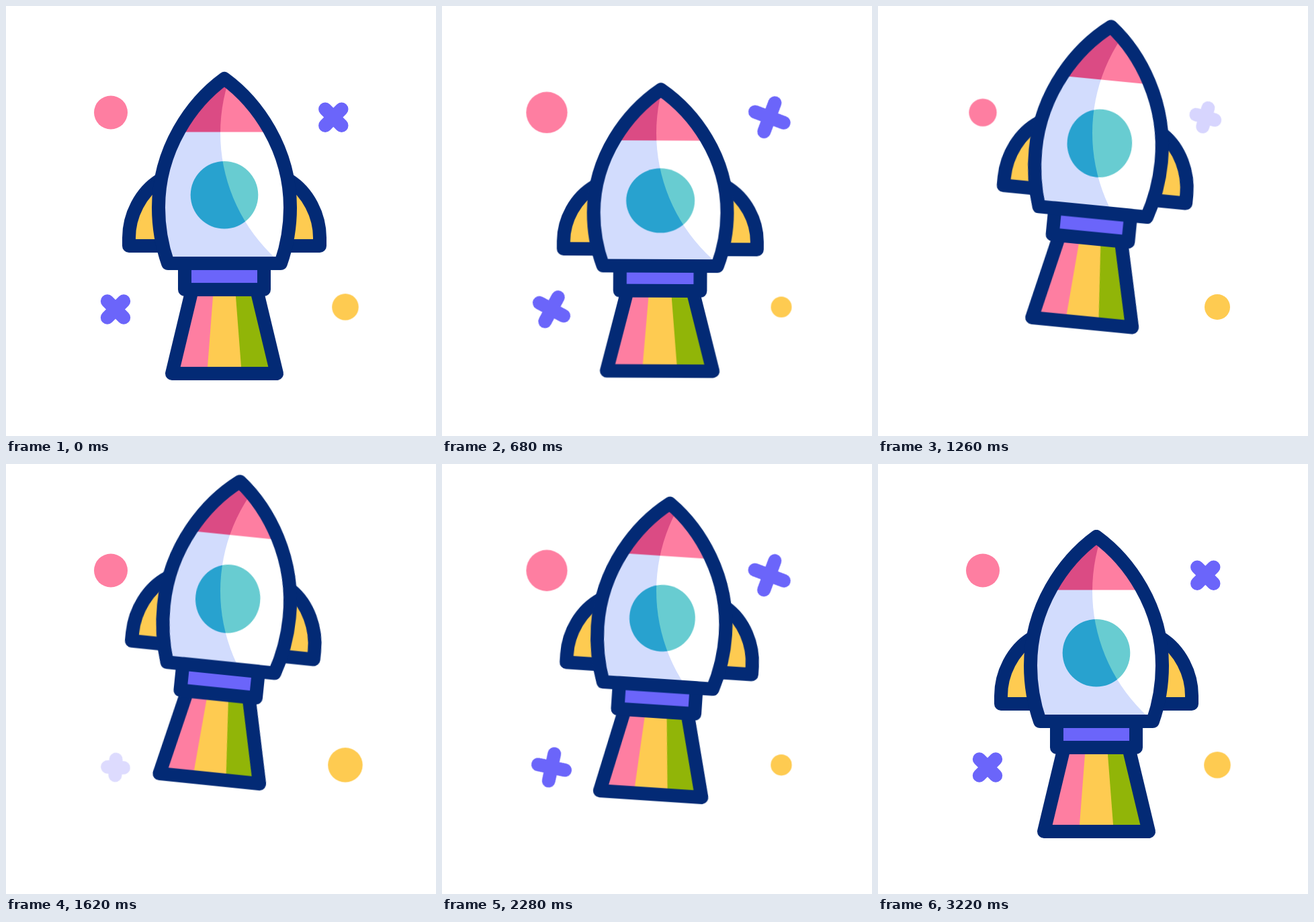
Write an HTML page that moves like this. It is 640 px wide and 640 px high and loops after 3300 ms.

```html
<!DOCTYPE html>
<html lang="en">
<head>
<meta charset="utf-8">
<title>Rocket</title>
<style>
:root {
  --navy: #032a75;
  --pink: #fe7ea1;
  --yellow: #fecb51;
  --purple: #6b65fa;
  --sine: cubic-bezier(.37, 0, .63, 1);
  --in: cubic-bezier(.33, 0, .67, .33);
  --out: cubic-bezier(.33, .67, .67, 1);
}
html, body { margin: 0; width: 100%; height: 100%; overflow: hidden; background: #fff; }
svg { display: block; width: 100%; height: 100%; }

.line, .cross {
  stroke-width: 20;
  stroke-linejoin: round;
  vector-effect: non-scaling-stroke;
}
.line { fill: none; stroke: var(--navy); }
.cross { fill: none; stroke: var(--purple); stroke-linecap: round; }

.fly, .squash, .cross, .dot { animation: 3300ms linear infinite; }
.fly { transform-origin: 325px 329px; animation-name: fly; }
.squash { transform-origin: 325px 547px; animation-name: squash; }
.pink { fill: var(--pink); transform-origin: 156px 158.5px; animation-name: pulse; animation-timing-function: var(--sine); }
.yellow { fill: var(--yellow); transform-origin: 505px 448px; animation-name: swell; animation-timing-function: var(--sine); }
.left { transform-origin: 163px 451.5px; animation-name: spin-left; }
.right { transform-origin: 487.3px 165.7px; animation-name: spin-right; }

@keyframes fly {
  0% { transform: translateY(0) rotate(0deg); }
  20% { transform: translateY(0) rotate(0deg); animation-timing-function: var(--in); }
  27.27% { transform: translateY(-49px) rotate(3.2deg); animation-timing-function: var(--out); }
  32.73% { transform: translateY(-73px) rotate(5.45deg); }
  38.18% { transform: translateY(-75px) rotate(5.6deg); }
  49.09% { transform: translateY(-77.5px) rotate(5.85deg); animation-timing-function: var(--sine); }
  54.55% { transform: translateY(-83px) rotate(6.4deg); animation-timing-function: var(--in); }
  59.39% { transform: translateY(-79.3px) rotate(6.05deg); animation-timing-function: var(--in); }
  66.06% { transform: translateY(-71.5px) rotate(5.3deg); }
  70.3% { transform: translateY(-49px) rotate(3.2deg); animation-timing-function: var(--out); }
  76.5% { transform: translateY(0) rotate(0deg); }
  100% { transform: translateY(0) rotate(0deg); }
}
@keyframes squash {
  0% { transform: scale(1, 1); animation-timing-function: var(--sine); }
  20% { transform: scale(1.017, .952); animation-timing-function: var(--in); }
  27.27% { transform: scale(.977, .981); animation-timing-function: var(--out); }
  32.73% { transform: scale(.962, 1.005); }
  38.18% { transform: scale(.96, 1.008); }
  54.55% { transform: scale(.958, 1.015); }
  59.39% { transform: scale(.96, 1.012); }
  66.06% { transform: scale(.963, 1.004); }
  70.3% { transform: scale(.977, .981); animation-timing-function: var(--out); }
  77.5% { transform: scale(1.017, .952); animation-timing-function: var(--sine); }
  97.58%, 100% { transform: scale(1, 1); }
}
@keyframes pulse {
  0%, 48.8%, 97.58%, 100% { transform: scale(1); }
  24.2%, 73% { transform: scale(1.24); }
  40.9%, 89.7% { transform: scale(.8); }
}
@keyframes swell {
  0% { transform: scale(.99); }
  4.85% { transform: scale(1.05); }
  24.2% { transform: scale(.75); animation-timing-function: var(--in); }
  38.18% { transform: scale(.95); animation-timing-function: var(--out); }
  49.7% { transform: scale(1.29); animation-timing-function: var(--in); }
  59.39% { transform: scale(1.1); animation-timing-function: var(--out); }
  73.9% { transform: scale(.76); }
  97.58%, 100% { transform: scale(.99); }
}
@keyframes spin-left {
  0% { transform: rotate(0deg) scale(1); opacity: 1; animation-timing-function: var(--in); }
  10.91% { transform: rotate(31deg) scale(1.21); }
  17% { transform: rotate(58deg) scale(1.32); }
  24% { opacity: 1; }
  27.27% { transform: rotate(101deg) scale(.95); opacity: .85; }
  33.9% { transform: rotate(130deg) scale(.6); opacity: 0; }
  34% { transform: rotate(-140deg) scale(.6); }
  47.3% { transform: rotate(-140deg) scale(.6); opacity: 0; }
  55% { opacity: 1; }
  59.39% { transform: rotate(-88deg) scale(1.19); }
  66.7% { transform: rotate(-45deg) scale(1.25); animation-timing-function: var(--out); }
  78.79% { transform: rotate(-5deg) scale(1.05); animation-timing-function: var(--out); }
  88%, 100% { transform: rotate(0deg) scale(1); opacity: 1; }
}
@keyframes spin-right {
  0%, 12% { transform: rotate(0deg) scale(1); opacity: 1; animation-timing-function: var(--in); }
  18.8% { transform: rotate(53deg) scale(1.26); }
  23.6% { transform: rotate(86deg) scale(1.43); }
  27.27% { transform: rotate(110.6deg) scale(1.4); opacity: 1; }
  31% { opacity: 1; }
  38.18% { transform: rotate(151deg) scale(.84); opacity: .28; }
  41.2% { transform: rotate(160deg) scale(.7); opacity: 0; }
  41.3% { transform: rotate(-160deg) scale(.7); }
  57.3% { transform: rotate(-160deg) scale(.7); opacity: 0; }
  59.39% { transform: rotate(-151deg) scale(.84); opacity: .17; }
  66.5% { opacity: 1; }
  70.3% { transform: rotate(-110deg) scale(1.4); }
  78.79% { transform: rotate(-53deg) scale(1.26); animation-timing-function: var(--out); }
  92%, 100% { transform: rotate(0deg) scale(1); opacity: 1; }
}
</style>
</head>
<body>
<svg viewBox="0 0 640 640">
  <defs>
    <path id="body" d="M325 108C277 143 227 212 227 300C227 330 233 360 241 383H409C417 360 423 330 423 300C423 212 373 143 325 108Z"/>
    <path id="fin" d="M229 259C200 277 183 312 183 345V357H229"/>
    <path id="flame" d="M277 422H373L403 547H247Z"/>
    <clipPath id="hull"><use href="#body"/></clipPath>
    <clipPath id="light"><circle cx="572" cy="189" r="253"/></clipPath>
  </defs>

  <circle class="dot pink" cx="156" cy="158.5" r="25"/>
  <circle class="dot yellow" cx="505" cy="448" r="20"/>
  <path class="cross left" d="M150.8 439.3l24.4 24.4m0-24.4l-24.4 24.4"/>
  <path class="cross right" d="M475.1 153.5l24.4 24.4m0-24.4l-24.4 24.4"/>

  <!-- shaded side -->
  <g class="fly"><g class="squash">
    <use href="#body" fill="#d2dcfd"/>
    <rect x="220" y="100" width="210" height="87.5" fill="#db4b84" clip-path="url(#hull)"/>
    <circle cx="325" cy="281.3" r="50.3" fill="#28a2cf"/>
  </g></g>

  <!-- lit side: the edge of the light stays still while the rocket moves -->
  <g clip-path="url(#light)"><g class="fly"><g class="squash">
    <use href="#body" fill="#fff"/>
    <rect x="220" y="100" width="210" height="87.5" fill="#fe7ea1" clip-path="url(#hull)"/>
    <circle cx="325" cy="281.3" r="50.3" fill="#68ccd1"/>
  </g></g></g>

  <!-- fins, flame, nozzle and outlines -->
  <g class="fly"><g class="squash">
    <use href="#fin" class="line" style="fill: var(--yellow)"/>
    <use href="#fin" class="line" style="fill: var(--yellow)" transform="matrix(-1 0 0 1 650 0)"/>
    <use href="#flame" fill="#fecb51"/>
    <path d="M277 422H308.8L299.2 547H247Z" fill="#fe7ea1"/>
    <path d="M341.2 422H373L403 547H350.8Z" fill="#91b508"/>
    <path class="line" d="M277 422H373L403 547H247Z"/>
    <path class="line" style="fill: var(--purple)" d="M266 383H384V422H266Z"/>
    <path class="line" d="M325 108C277 143 227 212 227 300C227 330 233 360 241 383H409C417 360 423 330 423 300C423 212 373 143 325 108Z"/>
  </g></g>
</svg>
<script>
// vector-effect is not inherited through <use>, so set it on the shared fin
document.getElementById('fin').style.vectorEffect = 'non-scaling-stroke';
</script>
</body>
</html>
```
